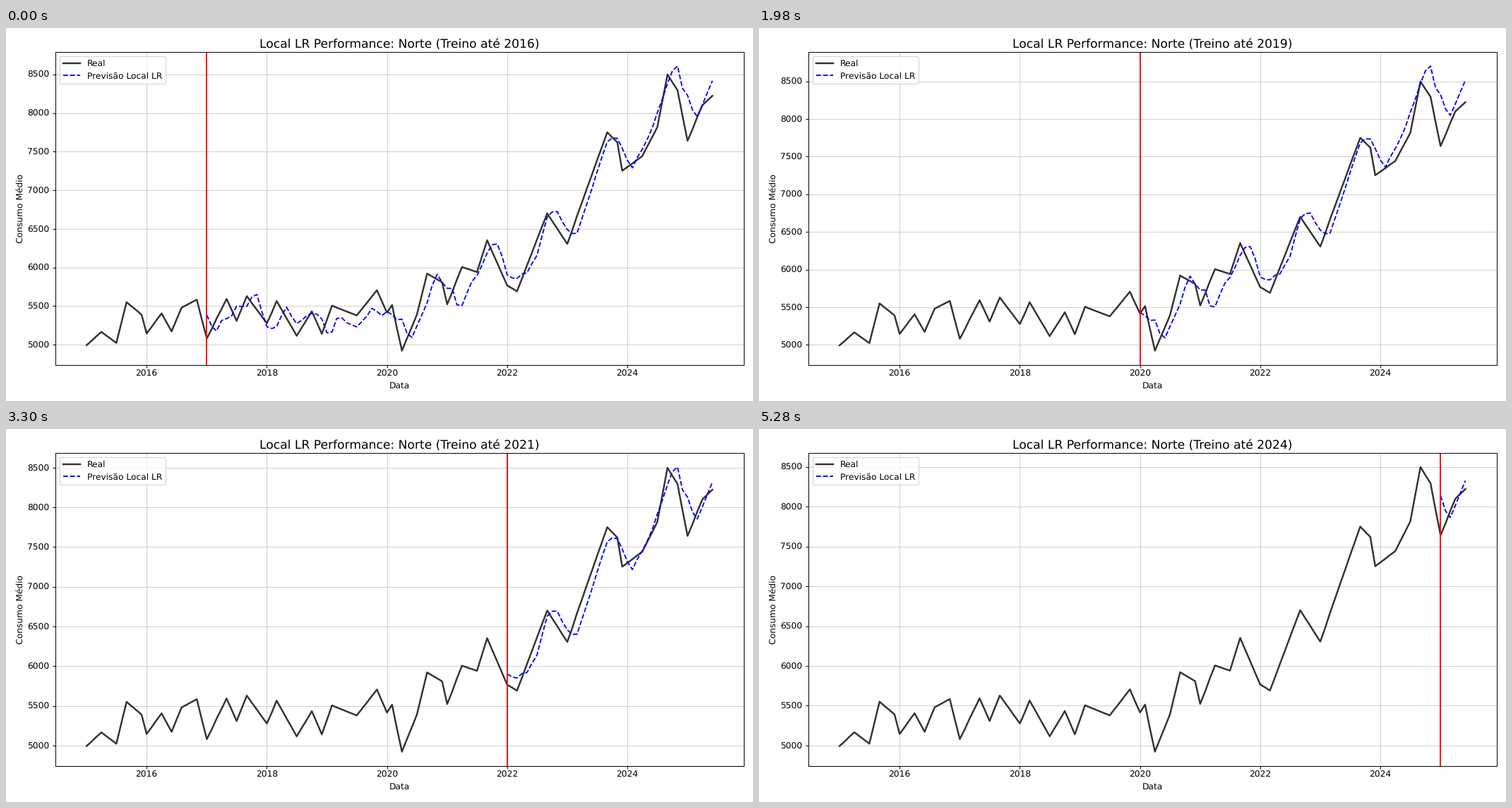
A matplotlib script that plays this animation: 1058 by 529 pixels, repeating every 5.94 s.

```python
import numpy as np
import matplotlib.pyplot as plt
from matplotlib.animation import FuncAnimation

plt.rcParams["font.family"] = "DejaVu Sans"
plt.rcParams["text.hinting"] = "none"

WIDTH, HEIGHT = 1058, 529
FIRST_YEAR = 2016
STEP_MS = 660

months = np.arange("2015-01", "2025-07", dtype="datetime64[M]").astype("datetime64[D]")
t = np.arange(len(months))


def polyline(points):
    """Value for every month from (month, value) key points."""
    return np.interp(t, *zip(*points))


# Turning points of the consumption curve
real = polyline([
    (0, 4993), (3, 5165), (6, 5022), (8, 5550), (11, 5390), (12, 5145),
    (15, 5405), (17, 5172), (19, 5480), (22, 5583), (24, 5080), (28, 5592),
    (30, 5308), (32, 5628), (36, 5277), (38, 5565), (42, 5115), (45, 5432),
    (47, 5140), (49, 5505), (54, 5378), (58, 5705), (60, 5415), (61, 5513),
    (63, 4922), (66, 5390), (68, 5920), (71, 5808), (72, 5522), (75, 6005),
    (78, 5940), (80, 6352), (84, 5765), (86, 5690), (92, 6700), (96, 6305),
    (104, 7750), (106, 7620), (107, 7252), (111, 7442), (114, 7815),
    (116, 8498), (118, 8295), (120, 7640), (123, 8100), (125, 8222)])

# Linear model: weighted lags, yearly season and a drifting intercept
lag_weights = {1: 0.15, 2: 0.45, 3: -0.1, 12: 0.45}
lagged = sum(w * np.roll(real, lag) for lag, w in lag_weights.items())
season = 70 * np.cos(2 * np.pi * (t - 8.5) / 12)
drift = polyline([(24, 330), (48, 190), (68, 230), (74, 480),
                  (90, 420), (98, 800), (125, 950)])
model = lagged + season + drift

# Each training year tilts the recent end of the forecast.
tilts = [-50, 20, 95, 45, 0, -150, -110, -75, -140]
ramp = np.clip((t - 84) / 34, 0, 1)

fig, ax = plt.subplots(figsize=(12, 6), dpi=(WIDTH + 0.01) / 12)
fig.subplots_adjust(left=69.8 / WIDTH, right=1044.8 / WIDTH,
                    top=1 - 33.8 / HEIGHT, bottom=1 - 477.8 / HEIGHT)
ax.plot(months, real, color="black", alpha=0.8, lw=2, label="Real")
guess, = ax.plot(months, model, "b--", lw=1.5, label="Previsão Local LR")
cut = ax.axvline(months[24], color="red", lw=1.5)
ax.tick_params(axis="x", pad=2.4)
ax.set_xlabel("Data", labelpad=4.2)
ax.set_ylabel("Consumo Médio", labelpad=3)
ax.grid(True, alpha=0.6)
ax.legend(loc="upper left")


def draw(i):
    year = FIRST_YEAR + i
    start = 12 * (year - 2014)
    values = (model + tilts[i] * ramp)[start:]
    guess.set_data(months[start:], values)
    cut.set_xdata([months[start]] * 2)
    low = min(real.min(), values.min())
    high = max(real.max(), values.max())
    pad = 0.05 * (high - low)
    ax.set_ylim(low - pad, high + pad)
    ax.set_title(f"Local LR Performance: Norte (Treino até {year})",
                 fontsize=14, pad=4.8)
    return guess, cut, ax.title


anim = FuncAnimation(fig, draw, frames=len(tilts), interval=STEP_MS,
                     repeat=True, repeat_delay=0)
plt.show()
```
